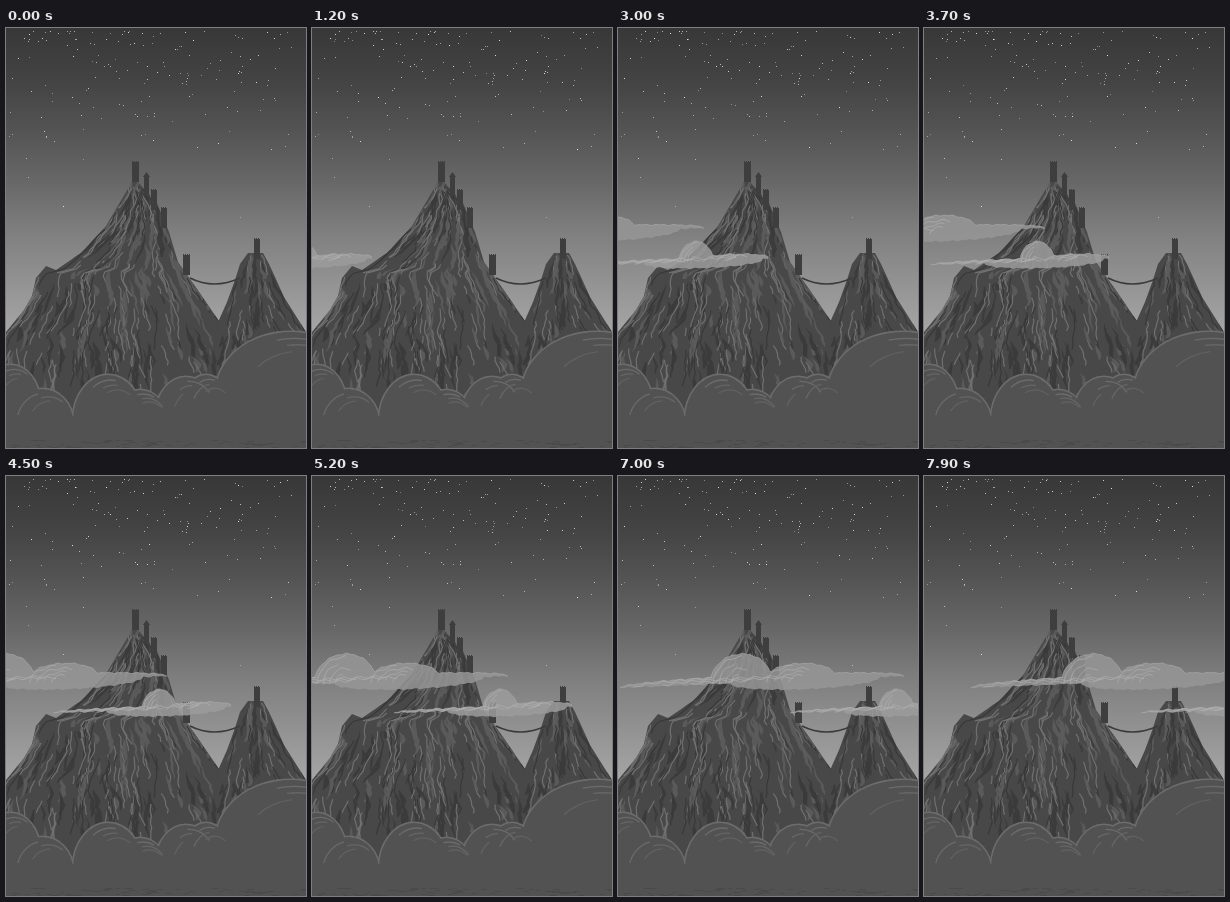
These frames come from a looping animation (300x420 px, 8 s). An HTML page with a canvas:

```html
<!DOCTYPE html>
<html lang="en">
<head>
<meta charset="utf-8">
<title>Night mountains</title>
<style>
html, body { margin: 0; width: 100%; height: 100%; overflow: hidden; background: #525252; }
canvas { display: block; width: 100vw; height: 100vh; image-rendering: pixelated; }
</style>
</head>
<body>
<canvas id="view" width="300" height="420"></canvas>
<script>
const W = 300, H = 420, LOOP = 8000, STEP = 100, SPEED = 0.05;
const ctx = document.getElementById('view').getContext('2d');

function seeded(s) {
  return () => {
    s = (s + 0x6D2B79F5) | 0;
    let t = Math.imul(s ^ (s >>> 15), 1 | s);
    t = (t + Math.imul(t ^ (t >>> 7), 61 | t)) ^ t;
    return ((t ^ (t >>> 14)) >>> 0) / 4294967296;
  };
}
const gray = (v, a = 1) => `rgba(${v},${v},${v},${a})`;
const mix = (a, b, k) => a + (b - a) * k;

function trace(g, list) {
  g.beginPath();
  list.forEach(([x, y]) => g.lineTo(x, y));
}
function fill(g, list, color) {
  trace(g, list);
  g.fillStyle = color;
  g.fill();
}
function stroke(g, list, color, width = 1) {
  trace(g, list);
  g.lineWidth = width;
  g.strokeStyle = color;
  g.stroke();
}

function drawSky(g) {
  const sky = g.createLinearGradient(0, 0, 0, 310);
  [56, 67, 84, 104, 128, 148, 168].forEach((v, i) => sky.addColorStop(i / 6, gray(v)));
  g.fillStyle = sky;
  g.fillRect(0, 0, W, H);
}

// Each side is a few [x, y] points from the summit down
const peaks = [
  { left: [[126, 154], [100, 198], [75, 225], [50, 242], [40, 238], [30, 250], [26, 268], [18, 282], [0, 304], [-20, 390]],
    right: [[132, 154], [151, 175], [163, 204], [172, 234], [184, 251], [213, 293], [250, 390]],
    count: 330, seed: 12 },
  { left: [[242, 225], [234, 236], [229, 252], [221, 274], [213, 292], [190, 390]],
    right: [[257, 225], [263, 236], [269, 249], [278, 269], [300, 304], [330, 390]],
    count: 110, seed: 5 }
];

function sideAt(side, y) {
  let i = 1;
  while (i < side.length - 1 && side[i][1] < y) i++;
  const [a, b] = side[i - 1], [c, d] = side[i];
  return mix(a, c, (y - b) / (d - b));
}

// Shards and cracks fan out from the summit, following both sides
function drawPeak(g, { left, right, count, seed }) {
  const rnd = seeded(seed), top = left[0][1], low = 385;
  g.save();
  fill(g, [...left, ...right.slice().reverse()], gray(72));
  g.clip();
  for (let i = 0; i < count; i++) {
    const start = mix(top - 6, low, Math.pow(rnd(), 0.8));
    const len = 10 + rnd() * 38, u = rnd(), kind = rnd(), wide = 2 + rnd() * 4;
    const path = [], back = [];
    let drift = 0;
    for (let y = start; y < start + len; y += 4) {
      const yy = Math.max(top, y);
      drift += (rnd() - 0.5) * 4;
      const x = mix(sideAt(left, yy), sideAt(right, yy), u) + drift;
      path.push([x, y]);
      back.unshift([x + wide * Math.sin(Math.PI * (y - start) / len), y]);
    }
    if (kind < 0.45) fill(g, [...path, ...back], gray(kind < 0.2 ? 58 : 92, 0.9));
    else stroke(g, path, kind < 0.62 ? gray(56) : gray(116, 0.9), 1.2);
  }
  g.restore();
}

function drawTowers(g) {
  g.fillStyle = gray(62);
  [[126, 134, 7], [138, 148, 5], [145, 162, 6], [155, 180, 6], [177, 227, 7], [248, 211, 6]]
    .forEach(([x, y, w]) => {
      g.fillRect(x, y, w, 20);
      for (let i = 0; i < w; i += 2) g.fillRect(x + i, y - 1, 1, 1);
    });
  fill(g, [[137, 149], [140.5, 144], [144, 149]], gray(62));
  g.beginPath();
  g.moveTo(184, 250);
  g.quadraticCurveTo(208, 262, 234, 250);
  g.lineWidth = 1.6;
  g.strokeStyle = gray(58);
  g.stroke();
}

// Foreground cloud bank: [cx, cy, rx, ry]
const puffs = [
  [5, 375, 29, 38], [36, 394, 31, 33], [102, 392, 35, 45], [134, 396, 28, 34],
  [180, 386, 30, 37], [200, 385, 26, 38], [285, 364, 75, 60]
];

function drawBank(g) {
  const body = gray(82), rnd = seeded(31);
  g.strokeStyle = gray(108);
  g.lineWidth = 3;
  const ring = ([x, y, rx, ry], from = 0, to = Math.PI * 2) => {
    g.beginPath();
    g.ellipse(x, y, rx, ry, 0, from, to);
  };
  puffs.forEach(p => { ring(p); g.stroke(); });
  g.fillStyle = body;
  puffs.forEach(p => { ring(p); g.fill(); });
  g.fillRect(0, 388, W, H);

  // Inner curls echo the crown of each puff
  g.lineWidth = 1.3;
  for (const [x, y, rx, ry] of puffs) {
    for (let i = 1; i < 4; i++) {
      const from = Math.PI * (1.05 + rnd() * 0.45), k = 1 - i * 0.09;
      g.strokeStyle = gray(112 - i * 5);
      ring([x + i * 3, y + i, rx * k, ry * k], from, from + 0.5 + rnd() * 0.6);
      g.stroke();
    }
  }
  g.fillStyle = gray(74);
  for (let i = 0; i < 60; i++) {
    g.fillRect(rnd() * W | 0, 412 + rnd() * 8 | 0, 3 + rnd() * 7 | 0, 1);
  }
}

function makeScene() {
  const c = document.createElement('canvas');
  c.width = W;
  c.height = H;
  const g = c.getContext('2d');
  drawSky(g);
  peaks.forEach(p => drawPeak(g, p));
  drawTowers(g);
  drawBank(g);
  return c;
}

function makeStars() {
  const rnd = seeded(77);
  const list = [[57, 178], [234, 189], [22, 149], [20, 130], [77, 131], [265, 121]];
  for (let i = 0; i < 150; i++) {
    list.push([2 + rnd() * 286 | 0, 3 + Math.pow(rnd(), 1.6) * 118 | 0]);
  }
  return list.map(([x, y]) => ({
    x, y, glow: 165 + rnd() * 65 | 0,
    phase: rnd() * 6.28, rate: 1 + Math.floor(rnd() * 6)
  }));
}

// Drifting clouds: a slanted axis with round bumps [centre, radius, height]
const clouds = [
  { x: -348, len: 284, from: 212, to: 200, tone: 151,
    bumps: [[142, 142, 7], [121, 31, 29], [180, 37, 17]], belly: [185, 75, 9] },
  { x: -178, len: 178, from: 237, to: 231, tone: 157,
    bumps: [[89, 89, 3], [106, 17, 20], [145, 36, 6]], belly: [113, 60, 7] }
];

const bump = ([c, r, h], x) => h * Math.sqrt(Math.max(0, 1 - ((x - c) / r) ** 2));
const axis = (c, x) => mix(c.from, c.to, x / c.len);

function shapeCloud(c) {
  const top = [], bottom = [];
  for (let x = 0; x <= c.len; x++) {
    const ripple = 0.7 * Math.sin(x * 0.55) * Math.sin(x * 0.17);
    top.push([x, axis(c, x) - Math.max(...c.bumps.map(b => bump(b, x))) + ripple]);
    bottom.unshift([x, axis(c, x) + bump(c.belly, x) + ripple]);
  }
  c.top = top;
  c.outline = [...top, ...bottom];
  c.curls = [];
  const rnd = seeded(c.len);
  for (const [mid, r, h] of c.bumps) {
    for (let i = 0; i < 4; i++) {
      const k = 0.9 - i * 0.2, a = mid - r * k, b = a + r * (0.6 + rnd() * 0.9) * k, curl = [];
      for (let x = a; x <= b; x++) {
        curl.push([x, axis(c, x) - bump([mid, r * k, h * k], x) + Math.sin(x * 0.4 + i)]);
      }
      c.curls.push(curl);
    }
  }
}
clouds.forEach(shapeCloud);

function drawCloud(c, t) {
  ctx.save();
  ctx.translate(c.x + t * SPEED, 0);
  fill(ctx, c.outline, gray(c.tone, 0.84));
  stroke(ctx, c.top, gray(172, 0.6));
  c.curls.forEach(l => stroke(ctx, l, gray(178, 0.65)));
  ctx.restore();
}

const scene = makeScene(), stars = makeStars();

function draw(t) {
  ctx.drawImage(scene, 0, 0);
  for (const s of stars) {
    const wave = Math.sin(s.phase + s.rate * t / LOOP * Math.PI * 2);
    ctx.fillStyle = gray(s.glow, 0.8 + 0.2 * wave);
    ctx.fillRect(s.x, s.y, 1, 1);
  }
  clouds.forEach(c => drawCloud(c, t));
}

const start = performance.now();
function frame() {
  const t = (performance.now() - start) % LOOP;
  draw(Math.floor(t / STEP) * STEP);
  requestAnimationFrame(frame);
}
frame();
</script>
</body>
</html>
```
